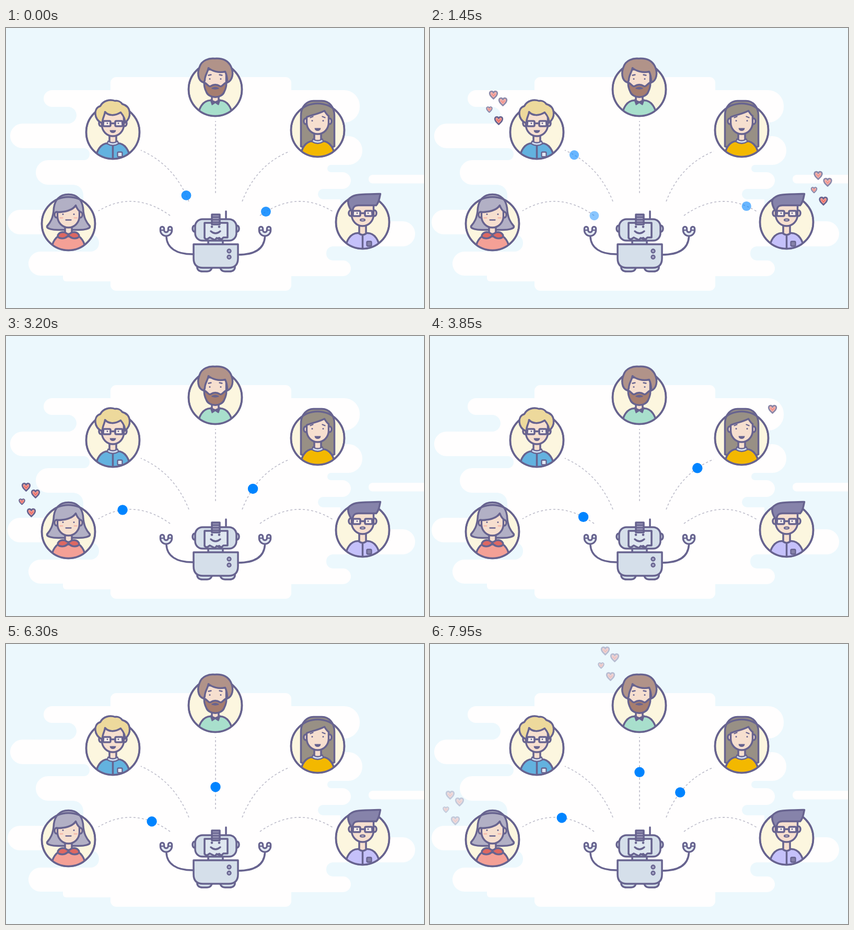
Animation of 800 by 536 pixels, one loop 8000 ms. Source, as an HTML page:

```html
<!DOCTYPE html>
<html lang="en">
<head>
<meta charset="utf-8">
<title>Robot and friends</title>
<style>
html, body { margin: 0; width: 100%; height: 100%; overflow: hidden; background: #ecf8fd; }
svg { display: block; width: 800px; height: 536px; }
.ink { stroke: #67638f; stroke-width: 3.5; stroke-linejoin: round; stroke-linecap: round; fill: none; }
.skin { fill: #f6dfcf; }
.dot { fill: #67638f; stroke: none; }
.thin { stroke-width: 2.3; }
.steel { fill: #d5dfea; }
.bust { clip-path: url(#disc); }
#ways { fill: none; stroke: #bcbbc9; stroke-width: 1.6; stroke-dasharray: 4 4; }
</style>
</head>
<body>
<svg viewBox="0 0 800 536">
  <defs>
    <clipPath id="disc"><circle r="51"/></clipPath>
    <circle id="plate" r="51" fill="#fcf6df"/>
    <g id="ears" class="skin"><ellipse cx="-22.500" cy="-17" rx="4" ry="5.500"/><ellipse cx="22.500" cy="-17" rx="4" ry="5.500"/></g>
    <path id="neck" class="skin" d="M-6.500 4V22Q0 27 6.500 22V4Z"/>
    <path id="face" class="skin" d="M-21-38V-14A21 21.500 0 0 0 21-14V-38Z"/>
    <path id="torso" d="M-33 60C-34 34-22 21-9 21H9C22 21 34 34 33 60Z"/>
    <g id="eyes" class="dot"><circle cx="-10.500" cy="-18" r="1.500"/><circle cx="10.500" cy="-18" r="1.500"/></g>
    <path id="smile" class="dot" d="M-6-4H6A6 5.500 0 0 1-6-4Z"/>
    <g id="glasses">
      <g fill="#f8eee9"><rect x="-18.500" y="-21.500" width="14" height="10" rx="2"/><rect x="4.500" y="-21.500" width="14" height="10" rx="2"/></g>
      <path d="M-4.500-17H4.500M-18-18H-21M18-18H21"/>
      <g class="dot"><circle cx="-10.500" cy="-17" r="1.400"/><circle cx="10.500" cy="-17" r="1.400"/></g>
    </g>
    <path id="collar" class="thin" fill="#cfdcf0" d="M-9 17Q0 23 9 17L11 22Q0 29-11 22Z"/>
    <g id="heart">
      <path class="ink" style="stroke-width:2.700;fill:#f49a92" d="M0 7.500C-3 4.500-7.300 1.500-7.300-2.800C-7.300-7.500-1.800-8.300 0-4C1.800-8.300 7.300-7.500 7.300-2.800C7.300 1.500 3 4.500 0 7.500Z"/>
      <path d="M-3.500-2L0 2L3.500-2" fill="none" stroke="#e8665f" stroke-width="1.500"/>
    </g>
    <g id="claw">
      <path d="M-7.500-8V-5A7.500 7.500 0 0 0 7.500-5V-8" stroke-width="10.500"/>
      <path d="M-7.500-8V-5A7.500 7.500 0 0 0 7.500-5V-8" style="stroke:#e4ebf3;stroke-width:4"/>
      <path class="thin" d="M-10-5H-5M5-5H10"/>
    </g>
  </defs>

  <rect width="800" height="536" fill="#ecf8fd"/>
  <g fill="#fffefe">
    <rect x="109" y="119" width="531" height="356"/>
    <rect x="109" y="440" width="300" height="45" rx="6"/>
    <rect x="200" y="94" width="346" height="409" rx="11"/>
    <rect x="580" y="119" width="97" height="62" rx="30"/>
    <rect x="560" y="207" width="122" height="55" rx="27"/>
    <rect x="560" y="370" width="223" height="48" rx="24"/>
    <rect x="694" y="281" width="130" height="16.500" rx="8"/>
  </g>
  <g fill="#ecf8fd">
    <rect x="40" y="151" width="95" height="32" rx="16"/>
    <rect x="40" y="230" width="120" height="23" rx="11"/>
    <rect x="40" y="300" width="108" height="48" rx="20"/>
    <rect x="40" y="395" width="138" height="33" rx="16"/>
    <rect x="615" y="262" width="80" height="14" rx="7"/>
    <rect x="597" y="308" width="90" height="20" rx="10"/>
    <rect x="613" y="418" width="90" height="27" rx="13"/>
  </g>
  <g fill="#fffefe">
    <rect x="72" y="119" width="90" height="32" rx="16"/>
    <rect x="8" y="183" width="150" height="47" rx="23.500"/>
    <rect x="57" y="253" width="120" height="47" rx="23.500"/>
    <rect x="3" y="348" width="150" height="47" rx="23.500"/>
    <rect x="43" y="428" width="130" height="46" rx="23"/>
    <rect x="570" y="276" width="90" height="32" rx="16"/>
    <rect x="570" y="445" width="90" height="30" rx="15"/>
  </g>

  <g id="ways"></g>

  <g class="ink" transform="translate(204.500 199.500)">
    <use href="#plate"/>
    <g class="bust">
      <use href="#torso" fill="#63b2df"/><path d="M0 26V52"/>
      <rect class="thin" x="9" y="38" width="9" height="9" rx="2" fill="#dfe8f4"/>
    </g>
    <circle r="51"/>
    <use href="#neck"/><use href="#collar"/><use href="#ears"/><use href="#face"/>
    <path fill="#edd99c" d="M-22-18C-36-24-38-46-24-50C-19-60-6-64 4-60C11-61 16-57 18-54C36-49 36-28 23-18C24-26 20-32 15-38C4-31-8-31-15-39C-15-33-20-28-20-18Z"/>
    <use href="#glasses"/><use href="#smile"/>
  </g>

  <g class="ink" transform="translate(400.500 117.500)">
    <use href="#plate"/>
    <g class="bust"><use href="#torso" fill="#a8dfcc"/></g>
    <circle r="51"/>
    <use href="#neck"/>
    <path fill="#67638f" class="thin" d="M-9 20L0 24L9 20L6 29L0 25L-6 29Z"/>
    <use href="#face"/>
    <path fill="#a67d6f" d="M-21-13C-15-11-13-4-9-6Q0-12 9-6C13-4 15-11 21-13C22-5 19 1 17 5C12 18-12 18-17 5C-19 1-22-5-21-13Z"/>
    <path class="thin" fill="#f6dfcf" d="M-6-2Q0-5 6-2Q0 0-6-2Z"/>
    <path fill="#b19389" d="M-22-13C-35-17-34-34-30-43C-26-56-12-60-1-59C14-60 24-56 30-44C36-31 33-17 23-13C23-23 21-30 19-34C7-31-6-35-13-41C-14-33-20-28-20-18Z"/>
    <use href="#eyes" y="-2"/>
    <path class="thin" d="M-13-27L-8-28M8-28L13-27"/>
  </g>

  <g class="ink" transform="translate(596.500 195.500)">
    <use href="#plate"/>
    <path fill="#989085" d="M-32 31V-28C-32-46-20-56-8-56H8C22-56 32-44 32-28V31C22 36-22 36-32 31Z"/>
    <g class="bust"><use href="#torso" fill="#f3b800"/></g>
    <circle r="51"/>
    <use href="#neck"/><use href="#collar"/><use href="#ears"/>
    <path class="skin" d="M-21-25C-12-29 2-31 13-37Q17-30 21-27V-14A21 21.500 0 0 1-21-14Z"/>
    <use href="#eyes"/><use href="#smile"/>
    <path class="thin" d="M-14-24L-9-26M9-26L14-24"/>
  </g>

  <g class="ink" transform="translate(119.500 374.500)">
    <use href="#plate"/>
    <path fill="#b2b0c5" d="M0-56C-18-56-26-44-28-30C-29-10-35-2-41 5C-42 10-30 12-20 12H20C30 12 42 10 41 5C35-2 29-10 28-30C26-44 18-56 0-56Z"/>
    <g class="bust"><use href="#torso" fill="#f4a096"/></g>
    <circle r="51"/>
    <use href="#neck"/>
    <path fill="#dd6862" d="M-6 17C-18 14-24 24-18 27C-10 30-3 27 0 22C3 27 10 30 18 27C24 24 18 14 6 17Q0 23-6 17Z"/>
    <use href="#ears"/>
    <path class="skin" d="M-21-22C-8-22 8-25 14-35Q17-27 21-24V-14A21 21.500 0 0 1-21-14Z"/>
    <use href="#eyes"/>
    <path class="thin" d="M-5-7H5"/>
    <path style="stroke:#f4b9aa" class="thin" d="M-16-11H-11M11-11H16"/>
  </g>

  <g class="ink" transform="translate(682.500 371.500)">
    <use href="#plate"/>
    <g class="bust">
      <use href="#torso" fill="#c5c1fa"/><path d="M0 26V52"/>
      <rect class="thin" x="8" y="37" width="9" height="9" rx="2" fill="#8581a8"/>
    </g>
    <circle r="51"/>
    <use href="#neck"/><use href="#ears"/><use href="#face"/>
    <path fill="#8683aa" d="M-22-22C-30-36-29-44-23-47C-16-53-8-53 34-54C32-46 32-38 26-32H-8C-14-32-18-30-19-22Z"/>
    <use href="#glasses"/>
    <ellipse class="thin" fill="#f8eee9" cx="0" cy="-4" rx="4.500" ry="1.800"/>
  </g>

  <g class="ink">
    <path d="M360 433C325 434 308 420 307 400M444 434C480 434 494 420 495.500 400"/>
    <use href="#claw" x="306.500" y="392"/><use href="#claw" x="495.500" y="392"/>
    <g class="steel">
      <path d="M366 456C365 463 370 466 376 466H385C391 466 394 462 395 456ZM438 456C439 463 434 466 428 466H419C413 466 410 462 409 456Z"/>
      <rect x="387" y="405" width="28" height="10"/>
      <path d="M359 414H444V441Q444 459 426 459H377Q359 459 359 441Z"/>
      <ellipse cx="361" cy="384" rx="4" ry="6"/><ellipse cx="442" cy="384" rx="4" ry="6"/>
      <rect x="362" y="366" width="79" height="41" rx="14"/>
      <path fill="#dfe7f0" d="M380 373H424V401H416L412 405L403 402L400 406L390 401L384 405L380 402Z"/>
      <rect x="394" y="357" width="15" height="19" fill="#9b98b9"/>
      <path class="thin" d="M394 362H409M394 367H409M394 372H409"/>
    </g>
    <path d="M421 351V365M392 389Q401 397 410 389"/>
    <path class="thin" d="M401 404L408 401L413 405"/>
    <g class="dot"><circle cx="394" cy="380.500" r="2.300"/><circle cx="408" cy="380.500" r="2.300"/></g>
    <g class="thin" fill="#a3a3c4"><circle cx="427" cy="427" r="3.500"/><circle cx="427" cy="438.500" r="3.500"/></g>
  </g>
  <g id="moving"></g>
</svg>

<script>
const LOOP = 8000;
const GRACE = 160; // fade time beyond both ends of a trip
// lead: hidden start, way: dashed line, love: first heart, turns: times of reaching the person
const friends = [
  { lead: '354 345', way: '350 332Q322 262 258 234', love: [131.5, 177], half: 1375, turns: [1250] },
  { lead: '470 371', way: '486 359Q557 309 625 351', love: [753, 331], half: 1375, turns: [1250] },
  { lead: '330 371', way: '314 359Q244.5 309.5 177 350', love: [48.5, 338], half: 1305, turns: [2760, 7250] },
  { lead: '448 345', way: '452 332Q479 262 543 236', love: [655.5, 140], half: 1580, turns: [4263, 8892] },
  { lead: '401 330', way: '401 316L401 178', love: [345.5, 62], half: 1397, turns: [7270] }
];
const cluster = [[0, 0, 1], [8, -36, 1], [-10, -49, 1], [-18, -21, .72]];

const add = (parent, tag, attrs) => {
  const el = document.createElementNS('http://www.w3.org/2000/svg', tag);
  for (const key in attrs) el.setAttribute(key, attrs[key]);
  if (parent) parent.append(el);
  return el;
};
const clamp = x => Math.max(0, Math.min(1, x));
const ways = document.getElementById('ways');
const moving = document.getElementById('moving');

for (const f of friends) {
  f.span = add(ways, 'path', { d: 'M' + f.way }).getTotalLength();
  f.track = add(null, 'path', { d: `M${f.lead}L${f.way}` });
  f.length = f.track.getTotalLength();
  f.hearts = cluster.map(([x, y, s]) => add(moving, 'use', {
    href: '#heart', transform: `translate(${f.love[0] + x} ${f.love[1] + y}) scale(${s})`
  }));
  f.ball = add(moving, 'circle', { fill: '#0084ff' });
}

function draw(t) {
  for (const f of friends) {
    const turn = f.turns.find(at => Math.abs(t - at) < f.half + GRACE) ?? Infinity;
    const dt = t - turn, away = Math.abs(dt);
    const shown = Math.min(clamp(away / 340), clamp((f.half + GRACE - away) / 340));
    f.ball.setAttribute('opacity', shown);
    if (shown) {
      const p = f.track.getPointAtLength(Math.max(0, f.length - f.span * away / f.half));
      f.ball.setAttribute('cx', p.x);
      f.ball.setAttribute('cy', p.y);
      f.ball.setAttribute('r', 8.2 + 1.5 * shown);
    }
    const out = clamp((770 - dt) / 230);
    f.hearts.forEach((h, i) => {
      const seen = i ? clamp((dt - 20) / 240) : clamp((dt + 520) / 140);
      h.setAttribute('opacity', Math.min(seen, out));
    });
  }
}

const start = performance.now();
function tick() {
  draw((performance.now() - start) % LOOP);
  requestAnimationFrame(tick);
}
tick();
</script>
</body>
</html>
```
